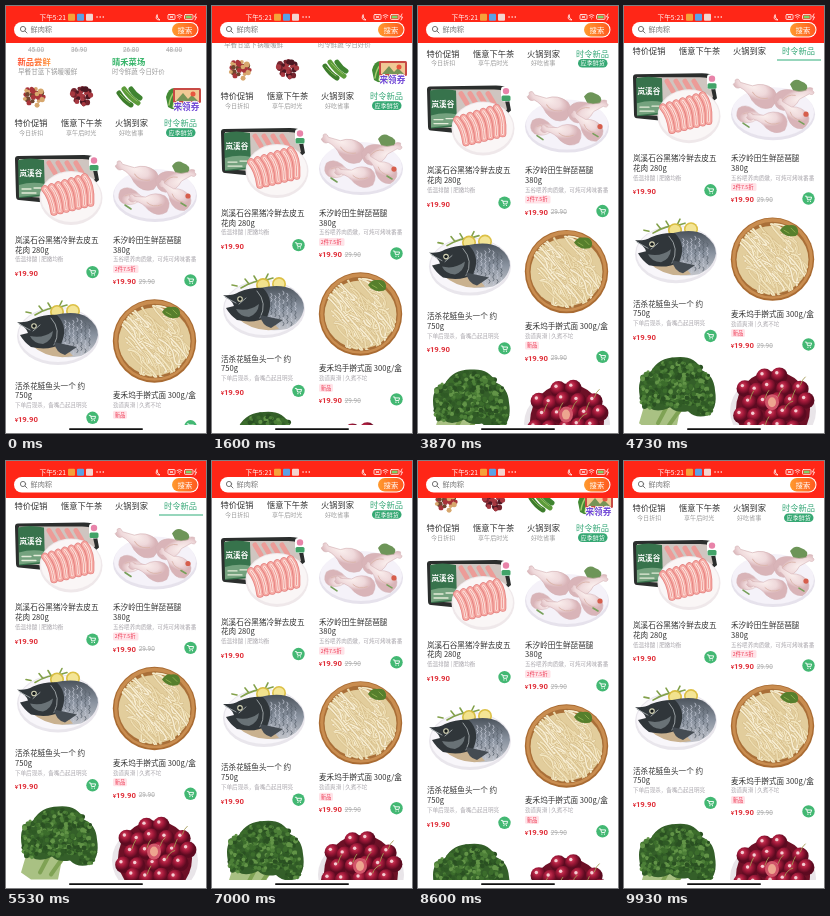
An HTML page that plays this animation: 200x427 px, repeating every 9.99 s.

```html
<!DOCTYPE html>
<html lang="zh-CN">
<head>
<meta charset="utf-8">
<title>生鲜商城</title>
<style>
html, body { margin: 0; width: 100%; height: 100%; overflow: hidden; background: #fff; }
svg { display: block; width: 100%; height: 100%; }
text { font-family: "Noto Sans CJK SC", "Noto Sans CJK", sans-serif; fill: #333; }
.name { font-size: 7.6px; }
.note { font-size: 5.55px; fill: #aaa7ad; }
.price, .old { font-family: Roboto, sans-serif; }
.price { font-size: 7.8px; font-weight: 700; fill: #e0303a; }
.old { font-size: 6.4px; fill: #aaa; text-decoration: line-through; text-decoration-thickness: .5px; }
.badge { font-size: 5.3px; fill: #ee3b55; }
.tab { font-size: 8.25px; }
.sub { font-size: 6.1px; fill: #999; }
.head { font-size: 8.3px; font-weight: 700; }
.white { fill: #fff; }
.line { fill: none; stroke-linecap: round; stroke-linejoin: round; }
</style>
</head>
<body>
<svg viewBox="0 0 200 427">
  <defs>
    <linearGradient id="go"><stop stop-color="#ff9a2e"/><stop offset="1" stop-color="#ff5a1f"/></linearGradient>
    <linearGradient id="fresh"><stop stop-color="#ff4b2b"/><stop offset="1" stop-color="#ff9b45"/></linearGradient>
    <linearGradient id="skin" x2="0" y2="1"><stop stop-color="#4b535c"/><stop offset=".5" stop-color="#8a93a0"/><stop offset="1" stop-color="#c3c5cb"/></linearGradient>
    <radialGradient id="leg" cx=".4" cy=".3"><stop stop-color="#fbf0ee"/><stop offset=".65" stop-color="#efd9db"/><stop offset="1" stop-color="#d9b4b8"/></radialGradient>
    <radialGradient id="cherry" cx=".38" cy=".32"><stop stop-color="#d84560"/><stop offset=".5" stop-color="#a3193a"/><stop offset="1" stop-color="#5c0a20"/></radialGradient>
    <clipPath id="bowl"><circle cx="148.5" cy="335" r="36.5"/></clipPath>
    <g id="cart">
      <circle r="6.2" fill="#43b873"/>
      <path class="line" stroke="#fff" stroke-width=".9" d="M-3.2-2.4h1.3l1 3.6h3.2l.8-2.6h-4.4"/>
      <circle cx="-.6" cy="2.8" r=".6" fill="#fff"/><circle cx="2" cy="2.8" r=".6" fill="#fff"/>
    </g>
  </defs>
  <rect width="200" height="427" fill="#fff"/>

  <g id="page">
    <text class="old" x="22" y="46">45.00</text><text class="old" x="65" y="46">36.90</text>
    <text class="old" x="117" y="46">26.80</text><text class="old" x="160" y="46">48.00</text>
    <text class="head" x="11.5" y="59.3" style="fill:url(#fresh)">新品尝鲜</text>
    <text class="sub" x="12" y="68.4" style="font-size:6.6px">早餐甘蓝下锅暖暖鲜</text>
    <text class="head" x="106" y="59.3" style="fill:#35b468">晴禾菜场</text>
    <text class="sub" x="106" y="68.4" style="font-size:6.4px">时令鲜蔬 今日好价</text>

    <g id="fruit"></g>
    <g class="line" stroke-width="5">
      <path d="M113 87q5 8 12 12" stroke="#3d7d2c"/><path d="M118 83q6 9 14 14" stroke="#5c9b3a"/>
      <path d="M125 83q4 6 9 9" stroke="#3f8430"/>
      <path d="M114 88q5 6 10 9m-5-13q6 7 12 11" stroke="#9cc66b" stroke-width=".8"/>
    </g>
    <g>
      <path d="M160 91q2-9 9-9 7 2 10 9l-1 11q-9 4-16-1z" fill="#438b35"/>
      <path class="line" stroke="#a8cf70" stroke-width="1.4" d="M163 99q1-8 6-14m-2 16q1-7 5-12"/>
      <rect x="167" y="82" width="28" height="15" rx="1.5" fill="#c84a45"/>
      <rect x="169" y="84" width="24" height="11" fill="#f0c995"/>
      <path d="M170 95l7-8 5 6 4-4 6 6z" fill="#769456"/>
      <circle cx="187" cy="88" r="2.5" fill="#e7553f"/>
      <text x="167.5" y="104" style="font-size:8.6px;font-weight:700;fill:#7047d6;stroke:#fff;stroke-width:1.6px;paint-order:stroke">来领券</text>
    </g>

    <g id="pork">
      <path d="M9 153q0-3 3-3l66-1q9 0 11 3l4 22-30 25-50-5q-3 0-3-4z" fill="#2b2e2d"/>
      <path d="M13 153h63q8 0 9 2l4 18-28 21-47-4z" fill="#cfc5c0"/>
      <path class="line" stroke="#ec9c98" stroke-width="5" d="M43 157l6 10m3-10l6 10m3-10l6 10m3-10l6 10"/>
      <path d="M12 154q12-3 26 0l1 36-26 2z" fill="#37734c"/>
      <path d="M13 179q13-4 26-1v10l-26 3z" fill="#74a27e"/>
      <path class="line" stroke="#e3ecd9" stroke-width="1.3" d="M16 183h9m3-1h7m-19 5h14"/>
      <text class="white" x="13.5" y="170" style="font-size:7.6px;font-weight:700">岚溪谷</text>
      <ellipse cx="65" cy="192" rx="31.5" ry="27" fill="#efe8ea"/>
      <ellipse cx="65" cy="191" rx="30" ry="25" fill="#faf6f6"/>
      <g id="slices"></g>
      <rect x="83" y="150" width="10" height="15" rx="3" fill="#fff"/>
      <circle cx="88" cy="154.5" r="3.2" fill="#e883a9"/>
      <rect x="83.5" y="159" width="9" height="5.5" rx="1.5" fill="#42a368"/>
    </g>

    <g id="chicken">
      <ellipse cx="149" cy="190" rx="42" ry="26" fill="#e6e2ec"/>
      <ellipse cx="149" cy="188" rx="41" ry="25" fill="#f5f2f9"/>
      <path d="M166 160q5-7 11-3 8 2 6 10l-12 3z" fill="#6d9558"/>
      <g id="legs"></g>
      <circle cx="182" cy="190" r="2.6" fill="#d65e4c"/>
      <path class="line" stroke="#77a05a" stroke-width="1.6" d="M119 199l6 4m50-6l5 3"/>
    </g>

    <g id="fish">
      <ellipse cx="52" cy="330" rx="41" ry="29" fill="#e9e6ec"/>
      <ellipse cx="52" cy="329" rx="39.5" ry="27" fill="#f8f6fa"/>
      <path class="line" stroke="#83a14b" stroke-width="1.6" d="M29 309q13-8 27-8m-19 4l-4-5m12 2l-3-5m11 4l3-6m-2 6l7-2m-36 8l-5-1"/>
      <circle cx="51" cy="306" r="7" fill="#d8bd42"/><circle cx="51" cy="306" r="5.4" fill="#f2e28d"/>
      <circle cx="67" cy="305" r="7" fill="#dcc046"/><circle cx="67" cy="305" r="5.4" fill="#f4e596"/>
      <path d="M48 309q22-5 33 2 11 8 11 18-2 14-17 21-21 4-31-4z" fill="url(#skin)"/>
      <g id="scales"></g>
      <path d="M24 338q15 2 25-3 10 5 18 15-24 5-43-12z" fill="#c9b18f"/>
      <path d="M11 316q9 1 16-3 13-5 24-4 12 12 4 29-12 7-30 3-7-5-11-12l8-2q-1-5-11-11z" fill="#30363a"/>
      <path d="M24 330q13 3 23-5-1 10-10 13-10-1-13-8z" fill="#697276"/>
      <path class="line" stroke="#a3aaac" stroke-width=".9" d="M45 312q11 12 3 27m-35-21l11 6m3 1l7-6"/>
      <path d="M48 336l23 5-12 8q-9-2-11-13z" fill="#444b52"/>
      <circle cx="28" cy="320" r="2.8" fill="#d8d7b9"/><circle cx="28" cy="320" r="1.7" fill="#14191c"/>
    </g>

    <g id="noodle">
      <circle cx="148.5" cy="335" r="41.7" fill="#a96b32"/>
      <circle cx="148.5" cy="334.5" r="40.3" fill="#c98d50"/>
      <circle cx="148.5" cy="335" r="37.3" fill="#a96f38"/>
      <g id="strands" clip-path="url(#bowl)"></g>
      <path d="M156 306q4-6 9-5 8-1 9 5 1 6-5 6-8 1-13-6z" fill="#567f2c"/>
      <path class="line" stroke="#89aa4b" d="M160 306l5 3m2-5l4 4"/>
    </g>

    <g id="broccoli">
      <path d="M20 482l18-8 26 4-9 13-3 15H25l-10-7z" fill="#a9c183"/>
      <path class="line" stroke="#7fa254" stroke-width="4" d="M34 499l9-17m2 19l12-17"/>
    </g>
    <g id="cherries">
      <ellipse cx="149" cy="487" rx="43" ry="37" fill="#e9e5e9"/>
      <ellipse cx="149" cy="485" rx="37" ry="38" fill="#6d1026"/>
    </g>
    <g id="cards"></g>
  </g>

  <g id="tabs">
    <rect id="bar" y="107" width="200" height="20" fill="#fff"/>
    <text class="tab" x="8.5" y="120">特价促销</text>
    <text class="tab" x="55" y="120">惬意下午茶</text>
    <text class="tab" x="109" y="120">火锅到家</text>
    <text class="tab" x="158" y="120" style="fill:#37a878">时令新品</text>
    <rect id="mark" x="153" y="125.3" width="44" height="1.4" fill="#6cc5a0"/>
    <g id="subs">
      <text class="sub" x="13" y="128.8">今日折扣</text>
      <text class="sub" x="60" y="128.8">享午后时光</text>
      <text class="sub" x="113" y="128.8">好吃省事</text>
      <rect x="160" y="122.3" width="29.5" height="8.6" rx="4.3" fill="#35a873"/>
      <text class="sub" x="162.6" y="128.8" style="fill:#fff">应季鲜货</text>
    </g>
  </g>

  <g id="top">
    <rect width="200" height="37" fill="#ff2617"/>
    <text class="white" x="33.5" y="13.6" style="font-size:6.7px">下午5:21</text>
    <rect x="62" y="7.7" width="7" height="7" rx="1" fill="#f5a23a"/>
    <rect x="71" y="7.7" width="7" height="7" rx="1" fill="#5ba2e6"/>
    <rect x="80" y="7.7" width="7" height="7" rx="1" fill="#f4d5d0"/>
    <path d="M91 11h9" class="line" stroke="#fff" stroke-width="1.4" stroke-dasharray=".1 3"/>
    <g class="line" stroke="#fff" stroke-width=".8">
      <path d="M151 9q-3 5 3 5-3-1-3-5z"/>
      <rect x="162" y="8.5" width="7" height="5" rx="1"/><path d="M164 10l3 2m0-2l-3 2"/>
      <path d="M171 9.5q2.5-2 5 0m-4 1.6q1.5-1.2 3 0m-1.5 1.7v.1"/>
      <rect x="178.5" y="8.6" width="8.5" height="4.8" rx="1"/>
    </g>
    <rect x="179.6" y="9.6" width="6" height="2.8" fill="#7ed36a"/>
    <path d="M190 8l-1.5 3h2l-1.5 3" class="line" stroke="#fff" stroke-width=".8"/>
    <rect x="8" y="16" width="184.5" height="15.5" rx="7.75" fill="#fff"/>
    <g class="line" stroke="#666" stroke-width=".9"><circle cx="17" cy="23" r="2.6"/><path d="M19 25l2 2"/></g>
    <text x="24.5" y="26.4" style="font-size:7.2px;fill:#777">鲜肉粽</text>
    <rect x="166" y="17" width="25.5" height="13.5" rx="6.75" fill="url(#go)"/>
    <text class="white" x="171.5" y="26.5" style="font-size:7.4px">搜索</text>
  </g>
  <rect y="419" width="200" height="8" fill="#fff"/>
  <rect x="63" y="422.2" width="74" height="1.8" rx=".9" fill="#111"/>
</svg>

<script>
const $ = id => document.getElementById(id);
const add = (id, markup) => $(id).insertAdjacentHTML('beforeend', markup);
const text = (cls, x, mid, size, s) => `<text class="${cls}" x="${x}" y="${mid + size * .37}">${s}</text>`;
const dot = (x, y, r, fill) => `<circle cx="${x}" cy="${y}" r="${r}" fill="${fill}"/>`;
const curve = (d, color, width) => `<path class="line" d="${d}" stroke="${color}" stroke-width="${width}"/>`;

let seed = 7;
const rnd = (a = 0, b = 1) => {
  seed = (seed * 16807) % 2147483647;
  return a + (b - a) * seed / 2147483647;
};
const pick = list => list[Math.floor(rnd(0, list.length))];

// Random dots filling an ellipse
function heap(id, count, cx, cy, rx, ry, size, colors) {
  for (let i = 0; i < count; i++) {
    const a = rnd(0, 6.28), d = Math.sqrt(rnd());
    add(id, dot(cx + Math.cos(a) * d * rx, cy + Math.sin(a) * d * ry, rnd(size * .6, size), pick(colors)));
  }
}

function card({ x, y, lines, note, badge, old }) {
  let out = '';
  for (const s of lines) {
    out += text('name', x, y, 7.6, s);
    y += 9.7;
  }
  out += text('note', x, y, 5.55, note);
  if (badge) {
    y += 9.5;
    const w = badge.length > 2 ? 25.5 : 14;
    out += `<rect x="${x}" y="${y - 4}" width="${w}" height="8" rx="1.5" fill="#ffe3e8"/>` + text('badge', x + 1.7, y, 5.3, badge);
  }
  y += badge ? 12.5 : 13.7;
  out += `<text class="price" x="${x}" y="${y + 2.9}"><tspan font-size="5.4">¥</tspan>19.90</text>`;
  if (old) out += text('old', x + 25.7, y, 6.4, old);
  return out + `<use href="#cart" x="${x + 77.5}" y="${y - 1}"/>`;
}

const goods = [
  { x: 9, y: 234, lines: ['岚溪石谷黑猪冷鲜去皮五', '花肉 280g'], note: '低温排酸 | 肥嫩均衡' },
  { x: 107, y: 234, lines: ['禾汐岭田生鲜琵琶腿', '380g'], note: '五谷喂养肉质嫩，可炖可烤味番番', badge: '2件7.5折', old: '29.90' },
  { x: 9, y: 379.7, lines: ['活杀花鲢鱼头一个 约', '750g'], note: '下单后现杀，备嘴凸起且明亮' },
  { x: 107, y: 389.6, lines: ['麦禾坞手擀式面 300g/盒'], note: '劲道爽滑 | 久煮不坨', badge: '新品', old: '29.90' }
];
add('cards', goods.map(card).join(''));

heap('fruit', 34, 27, 91, 11, 9, 3, ['#a9343a', '#70452f', '#d7a76d']);
heap('fruit', 34, 75, 91, 11, 9, 3, ['#74242e', '#a63840', '#4d1722']);

// Pork belly slices
for (let i = 0; i < 7; i++) {
  const x = 39 + i * 6.6, y = 183 - i * 2;
  const d = `M${x} ${y}q7 8 ${9 - i * .5} ${23 + i * .5}`;
  add('slices', curve(d, '#e4807f', 7.5) + curve(d, '#f6aaa4', 6) + curve(d, '#fde8e2', 2.6) + curve(d, '#ee9a96', 1));
}

// Drumsticks: centre, angle, scale
for (const [x, y, turn, size] of [[135, 170, 25, .95], [166, 174, 160, .85], [126, 191, 190, .7], [171, 191, 40, .8], [147, 197, 12, .85]]) {
  add('legs', `<g transform="translate(${x} ${y}) rotate(${turn}) scale(${size})">
    <path d="M-23-3q-4-4-6 0 2 2 0 5 5 4 8 0 9 0 17 7 13 7 22-2 4-13-6-18-13-3-22 6z" fill="url(#leg)" stroke="#d3b0b4" stroke-width=".6"/>
    <path class="line" d="M-7 1q8 5 17-1" stroke="#dbb5ab" stroke-width="1"/></g>`);
}

// Fish scales in staggered columns
for (let col = 0; col < 8; col++) {
  for (let row = 0; row < 8; row++) {
    const x = 55 + col * 4, y = 312 + row * 4.4 + (col % 2) * 2.2;
    if (Math.hypot(x - 68, (y - 329) * 1.2) < 21) add('scales', curve(`M${x} ${y}q2.5 2 0 4`, pick(['#58616c', '#c4cad6']), .8));
  }
}

// Noodle strands
add('strands', '<ellipse cx="148.5" cy="335.5" rx="36" ry="34" fill="#e2cd9c"/>');
for (let i = 0; i < 95; i++) {
  const a = rnd(0, 6.28), d = 28 * Math.sqrt(rnd()), r = rnd(12, 22);
  const x = 148.5 + Math.cos(a) * d, y = 335.5 + Math.sin(a) * d;
  const path = `M${x - r * .5} ${y - r * .6}q${rnd(0, r)} ${rnd(0, r * .4)} ${r * .7} ${r * .8}t${rnd(1, 7)} ${rnd(3, 9)}`;
  add('strands', curve(path, '#cdb27c', 2.3) + curve(path, pick(['#f3e6c0', '#eddcb0', '#f7edd0']), 1.7));
}

// Broccoli florets
const greens = ['#2f5a25', '#3c6d2c', '#4d8038', '#629447', '#2a5022'];
add('broccoli', '<path d="M15 464q0-13 12-17 8-14 25-14 19-2 26 13 12 5 13 20 3 18-7 25-12 4-20-4-12 2-18-4-12 6-20 1-11-3-11-20z" fill="#345f29"/>');
heap('broccoli', 260, 52, 459, 35, 23, 2.6, greens);
heap('broccoli', 50, 80, 479, 11, 12, 2.6, greens);
heap('broccoli', 40, 26, 475, 9, 10, 2.6, greens);

// Cherries
for (let row = 0; row < 5; row++) {
  for (let col = 0; col < 6; col++) {
    const x = 113 + col * 14 + (row % 2) * 6 + rnd(-2, 2), y = 452 + row * 13 + rnd(-2, 2);
    if (Math.hypot(x - 149, y - 484) > 35) continue;
    add('cherries', dot(x, y, 8.3, 'url(#cherry)') + dot(x - 2.5, y - 3, 1.7, '#f4ced4'));
    if (rnd() > .6) add('cherries', curve(`M${x} ${y - 4}q2-6 ${rnd(3, 8)} -8`, '#a39a55', .9));
  }
}
add('cherries', '<ellipse cx="148" cy="478" rx="7" ry="8" fill="#d1566a"/><ellipse cx="148" cy="478" rx="4" ry="5" fill="#eda58f"/>');

// Scroll: time, offset, velocity
const LOOP = 9990, STEP = 66.6, PIN = 74;
const keys = [
  [0, 0, .0165], [1600, 27, .018], [3870, 69.5, .0154], [5530, 87.5, .001],
  [7000, 73, -.0125], [8600, 50, -.001], [9930, 70, .015], [9990, 70.5, 0]
];

function scrollAt(t) {
  const i = Math.max(1, keys.findIndex(k => k[0] >= t));
  const [t0, p0, v0] = keys[i - 1], [t1, p1, v1] = keys[i];
  const h = t1 - t0, u = (t - t0) / h, w = 1 - u;
  return w * w * ((1 + 2 * u) * p0 + u * h * v0) + u * u * ((3 - 2 * u) * p1 - w * h * v1);
}

function draw() {
  const t = Math.floor((performance.now() % LOOP) / STEP) * STEP;
  const y = scrollAt(t), pinned = y > PIN;
  $('page').setAttribute('transform', `translate(0 ${-y})`);
  $('tabs').setAttribute('transform', `translate(0 ${pinned ? -72 : -y})`);
  for (const id of ['bar', 'mark']) $(id).style.display = pinned ? '' : 'none';
  $('subs').style.display = pinned ? 'none' : '';
  requestAnimationFrame(draw);
}
draw();
</script>
</body>
</html>
```
